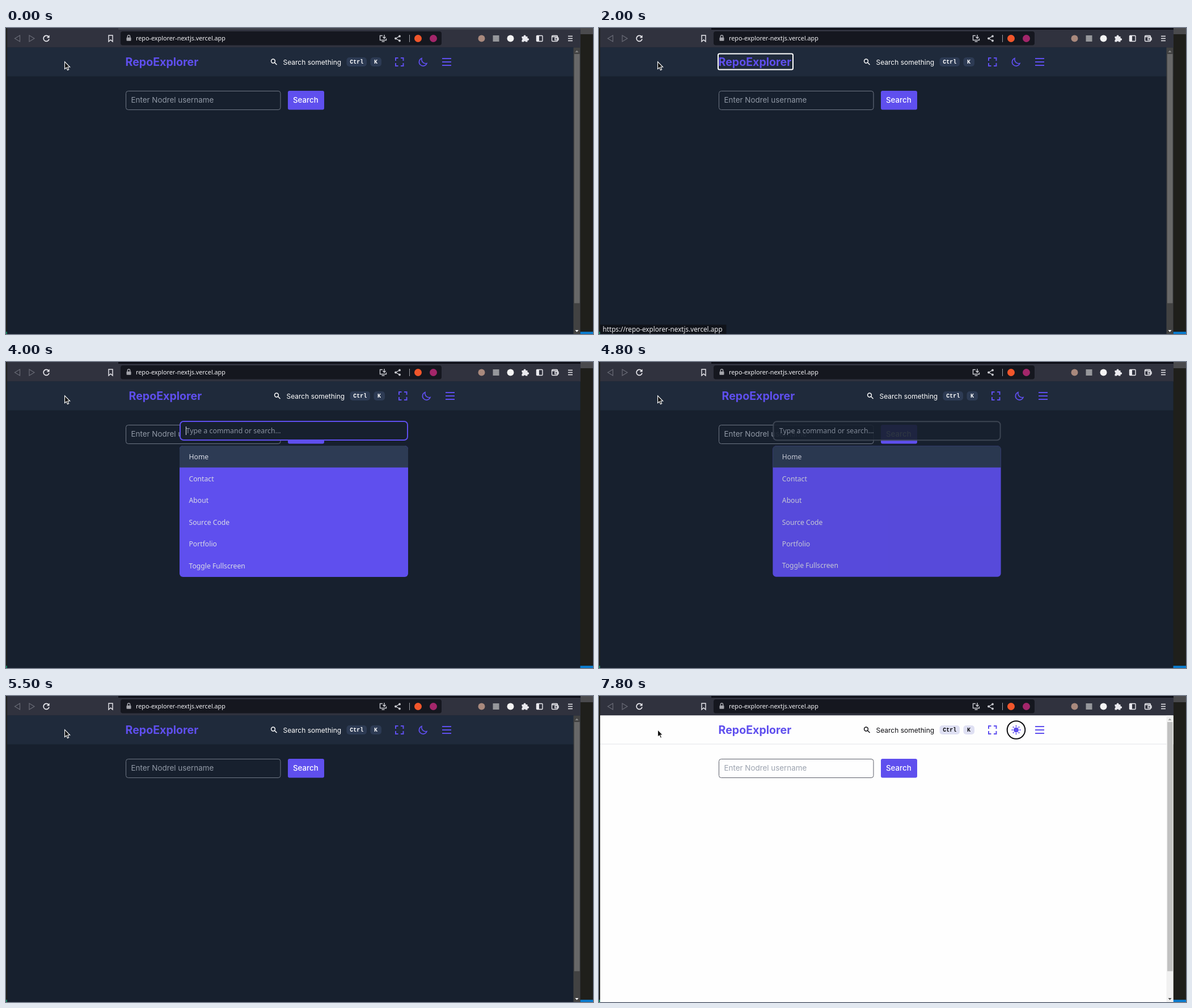
Write an HTML page that moves like this. It is 1035x541 px and loops after 8 s.

```html
<!DOCTYPE html>
<html lang="en">
<head>
<meta charset="utf-8">
<title>Repo explorer</title>
<style>
  html, body { margin: 0; width: 100%; height: 100%; overflow: hidden; background: #1f1f1b; }
  svg { display: block; }
  #stage {
    --page: #17202e; --bar: #1f2a3b; --rule: #1f2a3b; --ink: #fff; --key: #2d3b54;
    --border: #6f7785; --hint: #9199a6; --ring: #fff;
    --track: #424242; --thumb: #686868; --up: #858585; --down: #fff;
  }
  #stage.light {
    --page: #fefefe; --bar: #fefefe; --rule: #e4e5e9; --ink: #0c0c10; --key: #dfe0f3;
    --border: #5c5f6a; --hint: #9ca3af; --ring: #0c0c10;
    --track: #f1f1f1; --thumb: #c1c1c1; --up: #a3a3a3; --down: #505050;
  }
  .page { fill: var(--page); }
  .bar { fill: var(--bar); }
  .ink { fill: var(--ink); }
  .key { fill: var(--key); }
  .brand { fill: #5f4fee; }
  .line { fill: none; stroke-width: 2; }
  .accent { stroke: #5f4fee; }
  .ring { fill: none; stroke: var(--ring); stroke-width: 2; }
  .icon { fill: none; stroke: #e9e9ee; stroke-width: 1.4; }
  .solid { fill: #e9e9ee; stroke: none; }
  .ui { font-family: Inter, "Open Sans", sans-serif; }
  .system { font-family: "Noto Sans", "Open Sans", sans-serif; }
  .mono { font: bold 10px "Liberation Mono", monospace; }
</style>
</head>
<body>
<svg id="stage" width="1035" height="541" viewBox="0 0 1035 541">
  <!-- desktop behind the window -->
  <rect width="1035" height="541" fill="#1f1f1b"/>
  <rect x="1012" width="23" height="11" fill="#4a4a4d"/>
  <rect x="1012" y="537" width="23" height="4" fill="#0a7acc"/>
  <rect y="537" width="3" height="4" fill="#16825d"/>

  <!-- browser toolbar -->
  <rect x="2" width="1011" height="35" fill="#30323e"/>
  <rect id="tabs" x="198" width="815" height="3"/>
  <rect x="202" y="6" width="566" height="24.5" rx="4" fill="#15171f"/>
  <g class="icon">
    <path d="M24.5 13v11L15.500 18.500Z M41 13v11L50 18.500Z" stroke="#696b76" stroke-width="1.2"/>
    <path d="M75 15.300a5 5 0 1 0 1 4.200" stroke-width="1.7"/>
    <path d="M76.600 12.500v5h-5Z" class="solid"/>
    <path d="M181 13h7v11l-3.500-3-3.500 3Z"/>
    <path d="M214.300 17v-2a2.200 2.200 0 0 1 4.400 0v2" stroke="#a4a5ab"/>
    <rect x="212.500" y="16.800" width="8" height="6" rx="1" fill="#a4a5ab" stroke="none"/>
    <path d="M664 13.500h-4.500v8h11v-3M662.500 24h5M667 12v6M664.500 15.800l2.500 2.700 2.500-2.700" stroke="#c9cad0"/>
    <path d="M694 14.500l-7 4 7 4" stroke="#c9cad0"/>
    <g fill="#c9cad0" stroke="none">
      <circle cx="694" cy="14.500" r="1.900"/><circle cx="687" cy="18.500" r="1.900"/><circle cx="694" cy="22.500" r="1.900"/>
    </g>
    <path d="M711.500 12v13" stroke="#9b9ca3" stroke-width="1"/>
    <g stroke="none">
      <circle cx="726.500" cy="18.500" r="6.500" fill="#f1562b"/>
      <circle cx="753.500" cy="18.500" r="6.500" fill="#a3266a"/>
      <circle cx="838.500" cy="18.500" r="6" fill="#a9897d"/>
      <rect x="858.500" y="13" width="11" height="11" fill="#96979b"/>
      <circle cx="889.500" cy="18.500" r="6" fill="#f4f4f4"/>
    </g>
    <path class="solid" d="M909.500 15h3.200a2 2 0 1 1 3.800 0h3v3.200a2 2 0 1 1 0 3.800v2.500h-3.200a1.800 1.800 0 0 0-3.400 0h-3.400v-3.200a1.800 1.800 0 0 0 0-3.400Z"/>
    <rect x="935.500" y="13.500" width="10.500" height="10" rx="1"/>
    <path class="solid" d="M936 14h4v9h-4Z"/>
    <rect x="962.500" y="13.500" width="10" height="10" rx="1.500"/>
    <path d="M963 15.500h9M968 17.500h6v3.500h-6Z"/>
    <path d="M991 14.500h8M991 18.500h8M991 22.500h8"/>
  </g>
  <text class="system" x="229" y="22" font-size="10.800" fill="#f3f3f6">repo-explorer-nextjs.vercel.app</text>

  <!-- web page -->
  <rect class="page" x="2" y="34.500" width="1010.500" height="506.500"/>
  <rect class="bar" x="2" y="34.500" width="1010.500" height="50.500"/>
  <rect x="2" y="84.500" width="1010.500" height="1" fill="var(--rule)"/>
  <g class="ui">
    <rect x="211.500" y="111.500" width="272.500" height="33" rx="4" fill="none" stroke="var(--border)"/>
    <text x="220.500" y="132" font-size="13.400" fill="var(--hint)">Enter Nodrel username</text>
    <rect class="brand" x="497" y="111" width="64" height="33.500" rx="3"/>
    <text x="506" y="132" font-size="13.300" font-weight="500" fill="#fff">Search</text>
  </g>

  <g id="header">
    <text class="ui brand" x="210.500" y="66.500" font-size="19.600" font-weight="700">RepoExplorer</text>
    <g fill="none" stroke="var(--ink)" stroke-width="1.500">
      <circle cx="471" cy="58.500" r="3.400"/><path d="M473.500 61l4 4"/>
    </g>
    <text class="ui ink" x="488.500" y="64.500" font-size="12">Search something</text>
    <rect class="key" x="600.500" y="52" width="35.500" height="16" rx="5"/>
    <rect class="key" x="642.500" y="52" width="19.500" height="16" rx="5"/>
    <text class="mono ink" x="606.300" y="62.500">Ctrl</text>
    <text class="mono ink" x="649" y="62.500">K</text>
    <g class="line accent">
      <path d="M687 58v-5h4.500M696 53h4.500v5M700.500 62v5h-4.500M691.500 67h-4.500v-5"/>
      <path id="moon" d="M733 53.500a7 7 0 1 0 9 9a7.400 7.400 0 0 1-9-9Z" stroke-width="1.700"/>
      <g id="sun"><circle class="brand" cx="735.500" cy="60" r="3.600"/></g>
      <path d="M769 54h16M769 60h16M769 66h16" stroke-width="1.800"/>
    </g>
    <rect class="ring" id="ring-logo" x="210" y="45.500" width="132" height="28" rx="2.500"/>
    <rect class="ring" id="ring-search" x="465.800" y="52" width="196" height="16" rx="2.500"/>
    <circle class="ring" id="ring-full" cx="693.800" cy="60" r="15.800"/>
    <circle class="ring" id="ring-theme" cx="735.500" cy="60" r="15.800"/>
  </g>

  <g id="scrollbar">
    <rect x="1000.500" y="34.500" width="12" height="506.500" fill="var(--track)"/>
    <rect x="1002" y="46" width="9.500" height="440.500" fill="var(--thumb)"/>
    <path d="M1003.500 43l3-3.500 3 3.500Z" fill="var(--up)"/>
    <path d="M1003.500 534l3 3.500 3-3.500Z" fill="var(--down)"/>
  </g>

  <g id="status">
    <rect x="2" y="524.500" width="222.500" height="16.500" fill="#10131a"/>
    <text id="status-text" class="system" x="6.500" y="537" font-size="11.700" fill="#eeeef1">https://repo-explorer-nextjs.vercel.app</text>
  </g>

  <g id="palette" class="system" font-size="12.400">
    <rect id="prompt" x="307" y="105" width="401" height="33" rx="6" fill="#17202e" stroke-width="2"/>
    <text x="317.500" y="126" fill="#8b93a1">Type a command or search…</text>
    <path id="caret" d="M317.500 114v15" stroke="#e5e7eb"/>
    <rect class="brand" x="306" y="148" width="403" height="232" rx="6"/>
    <path d="M306 186.500v-32.500a6 6 0 0 1 6-6h391a6 6 0 0 1 6 6v32.500Z" fill="#2d3b54"/>
    <g id="commands" font-size="12.200" font-weight="500" fill="#d9dbe6"></g>
  </g>

  <path d="M103.500 59.500v13l3-2.700 2 4.700 2.200-1-2-4.500h4Z" fill="#111" stroke="#fff" stroke-width="1.100"/>
</svg>

<script>
const LOOP = 8000;
const SVG = "http://www.w3.org/2000/svg";
const $ = id => document.getElementById(id);

function add(parent, name, attrs, text = "") {
  const node = document.createElementNS(SVG, name);
  for (const key in attrs) node.setAttribute(key, attrs[key]);
  node.textContent = text;
  $(parent).append(node);
}

["Home", "Contact", "About", "Source Code", "Portfolio", "Toggle Fullscreen"].forEach((label, i) =>
  add("commands", "text", { x: 322.5, y: 172 + i * 38.55 }, label));

for (let i = 0; i < 8; i++) {
  add("sun", "path", { d: "M735.5 54.200v-2.200", transform: `rotate(${i * 45} 735.5 60)` });
}

// Each step is [start time, value]; the value holds until the next step.
const steps = {
  ring: [[0, ""], [1200, "logo"], [3000, "search"], [4000, ""], [5600, "logo"], [6000, "search"],
    [6400, "full"], [7800, "theme"]],
  status: [[0, 0], [1500, 0.9], [2000, 1], [3300, 0.66], [3400, 0.33], [3500, 0],
    [5700, 0.6], [5800, 1], [6300, 0.66], [6400, 0.33], [6500, 0]],
  statusText: [[0, 1], [1500, 0.8], [2000, 1]],
  palette: [[0, 0], [4000, 1], [4800, 0.9], [4900, 0.66], [5500, 0]],
  scale: [[0, 1], [4100, 1.002], [4500, 1], [4800, 0.998], [4900, 0.995]],
};

const at = (name, time) => steps[name].findLast(([start]) => start <= time)[1];
const show = (id, visible) => $(id).setAttribute("display", visible ? "inline" : "none");

function render(time) {
  const light = time >= 7800;
  const open = at("palette", time) > 0;
  const ring = at("ring", time);
  const scale = at("scale", time);

  $("stage").classList.toggle("light", light);
  $("tabs").setAttribute("fill", time < 600 ? "#41434c" : "#0c0d16");
  for (const name of ["logo", "search", "full", "theme"]) show("ring-" + name, ring === name);
  show("moon", !light);
  show("sun", light);

  // The fixed header recentres while the scrollbar is hidden.
  show("scrollbar", !open);
  $("header").setAttribute("transform", `translate(${open ? 6 : 0} 0)`);

  $("status").setAttribute("opacity", at("status", time));
  $("status-text").setAttribute("opacity", at("statusText", time));

  show("palette", open);
  $("palette").setAttribute("opacity", at("palette", time));
  $("palette").setAttribute("transform", `translate(507.5 242) scale(${scale}) translate(-507.5 -242)`);
  $("prompt").setAttribute("stroke", time < 4800 ? "#5f4fee" : "#414957");
  show("caret", time < 4500);
}

const origin = performance.now();
function tick() {
  render((performance.now() - origin) % LOOP);
  requestAnimationFrame(tick);
}
tick();
</script>
</body>
</html>
```
